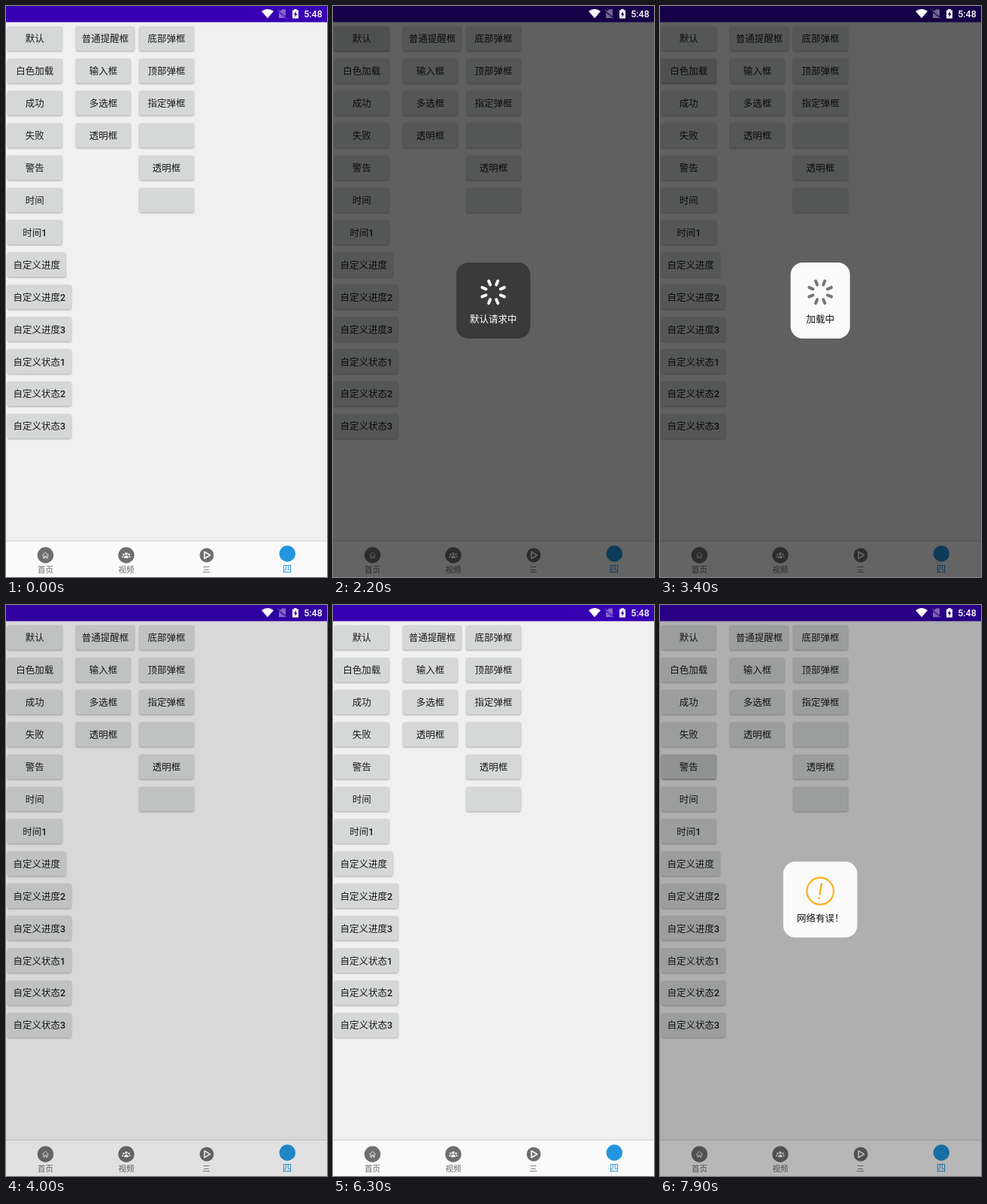
An HTML page that plays this animation: 427x759 px, repeating every 8000 ms.

```html
<!DOCTYPE html>
<html lang="zh-CN">
<head>
<meta charset="utf-8">
<style>
html, body { margin: 0; width: 100%; height: 100%; overflow: hidden; background: #f0f0f0; }
svg { display: block; width: 427px; height: 759px; }
text { font: 500 12.5px Roboto, "Noto Sans CJK SC", "Noto Sans CJK", sans-serif; text-anchor: middle; fill: #1c1c1c; }
.tab { font-size: 10.5px; font-weight: 400; fill: #666; }
.tab.on { font-size: 12.5px; fill: #2196de; }
.line { fill: none; stroke-linecap: round; stroke-linejoin: round; }
</style>
</head>
<body>
<svg viewBox="0 0 427 759">
  <defs>
    <filter id="soft" x="-20%" y="-40%" width="140%" height="190%"><feGaussianBlur stdDeviation="1"/></filter>
  </defs>
  <rect width="427" height="759" fill="#f0f0f0"/>
  <rect width="427" height="21.5" fill="#3700b3"/>
  <g id="buttons"></g>

  <rect y="711" width="427" height="48" fill="#fafafa"/>
  <rect y="710.5" width="427" height="1.5" fill="#dcdcdc"/>
  <g fill="#6e6e6e">
    <circle cx="52.5" cy="730" r="10.7"/>
    <circle cx="160" cy="730" r="10.7"/>
    <circle cx="267" cy="730" r="9.4"/>
  </g>
  <circle cx="374.3" cy="728" r="10.7" fill="#2196de"/>
  <path class="line" d="M48.5 730L52.5 726.3L56.5 730M49.8 730V734H51.5V731.2H53.5V734H55.2V730" stroke="#eee" stroke-width=".9"/>
  <g fill="#fafafa">
    <circle cx="160" cy="728" r="1.8"/>
    <circle cx="156.4" cy="729" r="1.3"/>
    <circle cx="163.6" cy="729" r="1.3"/>
    <path d="M157 734q0-3.5 3-3.5t3 3.5zM154.2 733q0-2.3 2.4-2.3l-.7 2.3zM165.8 733q0-2.3-2.4-2.3l.7 2.3z"/>
  </g>
  <path class="line" d="M264 725.5L271.5 730L264 734.5Z" stroke="#fafafa" stroke-width="1.6"/>
  <text class="tab" x="52.5" y="753">首页</text>
  <text class="tab" x="160" y="753">视频</text>
  <text class="tab" x="266.5" y="753">三</text>
  <text class="tab on" x="374" y="753">四</text>

  <rect id="dim" width="427" height="759"/>

  <g fill="#fff">
    <path d="M340 7Q348 1 356 7L348 16.3Z"/>
    <path d="M363.5 8L367 4.5H372V13.5L363.5 6.5ZM363 8.5V16H371.5Z" opacity=".4"/>
    <path class="line" d="M362 5L373 16.5" stroke="#fff" opacity=".4"/>
    <path fill-rule="evenodd" d="M381 5.5H383.4V4H386.6V5.5H389V16.5H381ZM385.8 7L382.8 11.6H384.6V15L387.4 10.3H385.8Z"/>
    <text x="408.5" y="15" style="fill:#fff">5:48</text>
  </g>

  <g id="card">
    <rect id="panel" y="341" height="101" rx="16"/>
    <g id="icon"></g>
    <text id="label" x="213.2" y="420.5"></text>
  </g>
</svg>
<script>
const $ = id => document.getElementById(id);
const LOOP = 8000, STEP = 100;

const columns = [
  [2, ['默认', '白色加载', '成功', '失败', '警告', '时间', '时间1', '自定义进度',
       '自定义进度2', '自定义进度3', '自定义状态1', '自定义状态2', '自定义状态3']],
  [93.2, ['普通提醒框', '输入框', '多选框', '透明框']],
  [177.3, ['底部弹框', '顶部弹框', '指定弹框', '', '透明框', '']]
];

function button(x, row, name) {
  const y = 27 + row * 42.93;
  const w = name.length > 5 ? 84.7 : name.length > 4 ? 77.5 : 72.5;
  const box = `x="${x}" width="${w}" height="32.5" rx="2"`;
  return `<g><rect ${box} y="${y + 1}" fill="#000" opacity=".3" filter="url(#soft)"/>
    <rect ${box} y="${y}" fill="#d6d7d7"/>
    <rect class="press" ${box} y="${y}" opacity="0"/>
    <text x="${x + w / 2}" y="${y + 21.2}">${name}</text></g>`;
}
$('buttons').innerHTML = columns.map(([x, names]) =>
  names.map((name, row) => button(x, row, name)).join('')).join('');
const presses = document.querySelectorAll('.press');

// Icons are drawn around the origin.
const spinner = color => Array.from({ length: 8 }, (_, i) =>
  `<path class="line" d="M0-10.5V-16" stroke="${color}" stroke-width="4" transform="rotate(${22.5 + i * 45})"/>`).join('');
const ring = (color, mark) => `<g class="line" stroke="${color}" stroke-width="2.3">
  <circle r="17.8"/>${mark}</g>`;

const icons = {
  light: spinner('#f4f4f4'),
  dark: spinner('#777'),
  check: ring('#1c9fe8', '<path d="M-9 0L-3 6.8L8.7-7.5" stroke-width="3"/>'),
  cross: ring('#e8483f', '<path d="M-6.5-6.5L6.5 6.5M6.5-6.5L-6.5 6.5" stroke-width="2.8"/>'),
  warn: ring('#fbb428', '<g transform="rotate(11)"><path d="M0-9.5V4" stroke-width="2.6"/><path d="M0 9.3V9.4" stroke-width="3"/></g>')
};

// Dim levels per step once a dialog opens or closes.
const OPENING = [.27, .6], CLOSING = [.35, .1];
const dialogs = [
  { press: 900, open: 1000, close: 2300, icon: 'light', label: '默认请求中', spin: 2200, night: true },
  { press: 2800, open: 2900, close: 3900, icon: 'dark', label: '加载中', spin: 2900 },
  { press: 4400, open: 4500, close: 6200, icon: 'check', label: '加载中', spin: 4900, fade: [.2] },
  { press: 6700, open: 6700, close: 7300, icon: 'cross', label: '加载失败' },
  { press: 7900, open: 7900, close: 9000, icon: 'warn', label: '网络有误！' }
];

let shown;
function setDialog(d) {
  if (d === shown) return;
  shown = d;
  const w = Math.max(79, d.label.length * 12.5 + 36);
  $('panel').setAttribute('x', 213.2 - w / 2);
  $('panel').setAttribute('width', w);
  $('panel').setAttribute('fill', d.night ? '#3a3a3a' : '#fafafa');
  $('icon').innerHTML = icons[d.icon];
  $('label').textContent = d.label;
  $('label').style.fill = d.night ? '#fff' : '#111';
}

function dimLevel(d, t) {
  if (t < d.open) return 0;
  if (t < d.close) return OPENING[Math.min((t - d.open) / STEP, 1)];
  return (d.fade || CLOSING)[(t - d.close) / STEP] || 0;
}

function draw(now) {
  const t = Math.floor(now % LOOP / STEP) * STEP;
  const row = dialogs.findLastIndex(d => t >= d.press);
  const d = dialogs[row];
  const open = !!d && t >= d.open && t < d.close;
  $('dim').setAttribute('opacity', d ? dimLevel(d, t) : 0);
  $('card').setAttribute('visibility', open ? 'visible' : 'hidden');
  presses.forEach((p, i) => {
    const down = i === row && t < d.close;
    p.setAttribute('opacity', down ? (t < d.open ? .03 : .07) : 0);
    p.previousElementSibling.previousElementSibling.setAttribute('opacity', down ? .5 : .3);
  });
  if (open) {
    setDialog(d);
    const angle = d.spin ? (t - d.spin) * .36 : 0;
    $('icon').setAttribute('transform', `translate(213.2 380.3) rotate(${angle})`);
  }
}

const start = performance.now();
function tick() {
  draw(performance.now() - start);
  requestAnimationFrame(tick);
}
tick();
</script>
</body>
</html>
```
